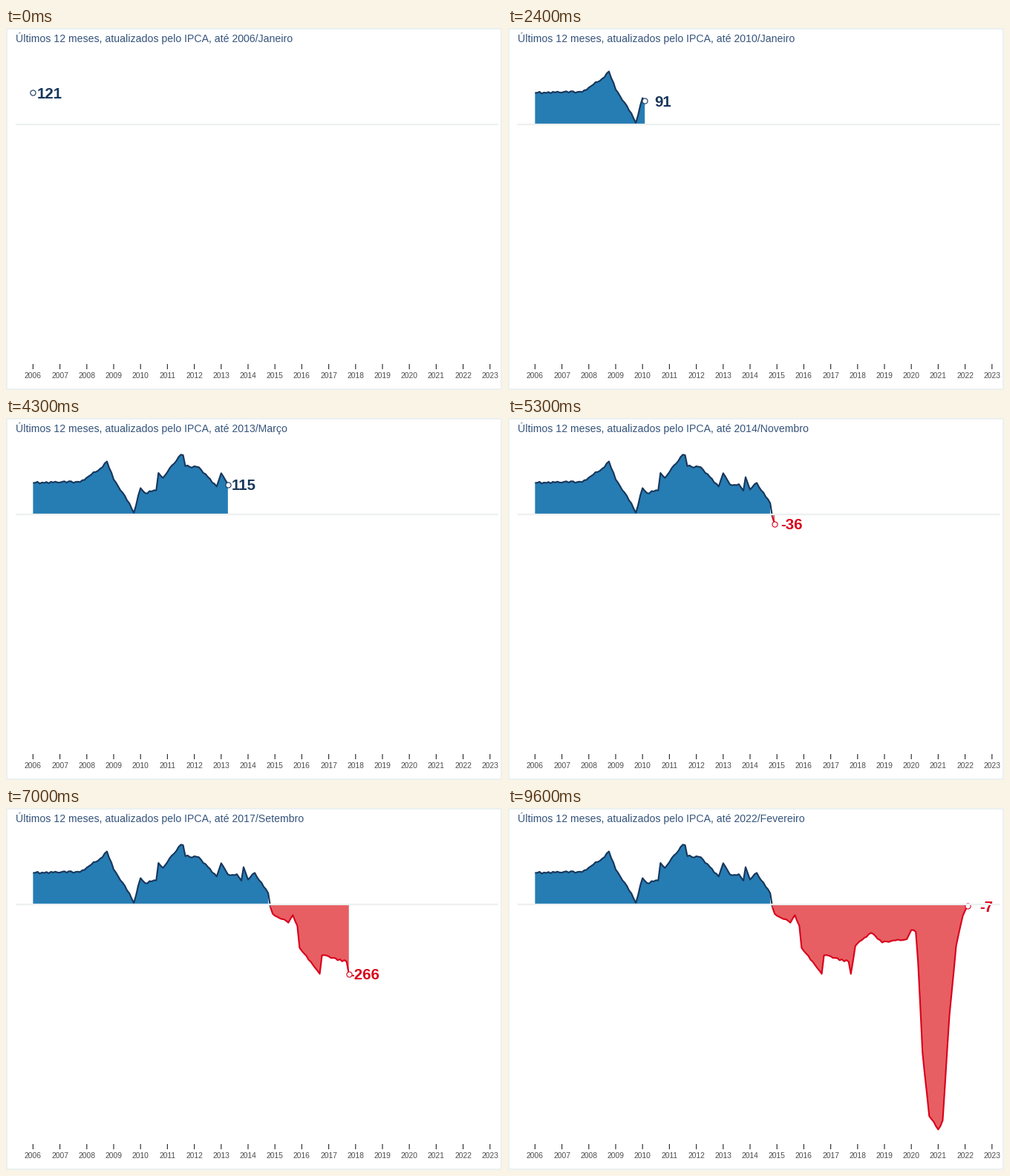
Animation, 668 px wide and 488 px high, one loop 9.7 s. Source, as a matplotlib script:

```python
import numpy as np
import matplotlib.pyplot as plt
from matplotlib.animation import FuncAnimation
from matplotlib.patches import Polygon, Rectangle

W, H, DPI = 668, 488, 100
FRAMES, LAST = 97, 193
ZERO_Y, Y_SCALE = 130, 0.352
X0, MONTH_W = 36.4, 36.2 / 12

NAVY, BLUE = "#17365c", "#267db3"
RED, PINK = "#d9001b", "#e75f63"
PALE = "#ecf0f1"

MONTHS = ("Janeiro Fevereiro Março Abril Maio Junho Julho Agosto "
          "Setembro Outubro Novembro Dezembro").split()

# Turning points (month, value); a small seeded ripple fills the gaps
TURNS = [
    (0, 121), (21, 124), (31, 181), (33, 203), (36, 134), (43, 43), (45, 6),
    (48, 101), (50, 82), (55, 92), (56, 159), (58, 140), (66, 229), (67, 227),
    (68, 185), (74, 181), (82, 107), (84, 158), (87, 115), (91, 116),
    (93, 91), (94, 143), (96, 95), (99, 121), (105, 43), (106, -11),
    (107, -36), (114, -70), (116, -41), (118, -82), (119, -166), (128, -266),
    (129, -195), (140, -219), (141, -266), (143, -159), (150, -109),
    (155, -146), (166, -133), (168, -98), (170, -105), (171, -221),
    (173, -568), (176, -811), (180, -862), (182, -827), (185, -426),
    (188, -159), (191, -43), (193, -7),
]

months = np.arange(LAST + 1)
turn_months, turn_values = np.array(TURNS).T
ripple = np.random.default_rng(4).uniform(-4, 4, LAST + 1)
ripple[turn_months] = 0
values = np.interp(months, turn_months, turn_values) + ripple
split = int(np.argmax(values < 0))
xs = X0 + months * MONTH_W
ys = ZERO_Y - values * Y_SCALE


def px(size):
    """Pixels to points."""
    return size * 72 / DPI


plt.rcParams["font.family"] = "Liberation Sans"
plt.rcParams["path.snap"] = False
fig = plt.figure(figsize=(W / DPI, H / DPI), dpi=DPI, facecolor="white")
ax = fig.add_axes([0, 0, 1, 1])
ax.set_xlim(0, W)
ax.set_ylim(H, 0)
ax.axis("off")


def rule(x, y, color, width, z=1):
    ax.plot(x, y, color=color, lw=px(width), solid_capstyle="butt", zorder=z)


# Static parts: border, zero line, year axis
ax.add_patch(Rectangle((1, 1), W - 2, H - 2, fill=False, ec=PALE, lw=px(2)))
rule([13, 662.5], [ZERO_Y, ZERO_Y], PALE, 2.2, z=9)
for year in range(2006, 2024):
    x = X0 + 12 * (year - 2006) * MONTH_W
    rule([x, x], [453, 460], "#333333", 1.2)
    ax.text(x, 472.5, str(year), size=px(10.3), color="#4d4d4d",
            ha="center", va="baseline")

title = ax.text(13, 19, "", size=px(14.15), color="#35537b", va="baseline")


def make_area(fill, edge, z):
    area = Polygon([(0, 0)], closed=True, fc=fill, ec="none", zorder=z)
    ax.add_patch(area)
    line, = ax.plot([], [], color=edge, lw=px(2.1), zorder=z + 1,
                    solid_joinstyle="round", solid_capstyle="butt")
    return area, line


blue = make_area(BLUE, NAVY, 2)
red = make_area(PINK, RED, 4)
label = ax.text(0, 0, "", size=px(20.4), weight="bold", va="baseline",
                zorder=6)
dot, = ax.plot([], [], "o", ms=px(7.2), mfc="#f6f9fb", mew=px(1.1), zorder=7)


def show(parts, start, fill_end, line_end):
    """Reveal one area from start up to, but not including, the given ends."""
    area, line = parts
    visible = fill_end > start
    area.set_visible(visible)
    line.set_visible(visible)
    if visible:
        x, y = xs[start:fill_end], ys[start:fill_end]
        top = np.column_stack([x, y])
        area.set_xy(np.vstack([(x[0], ZERO_Y), top, (x[-1], ZERO_Y)]))
        line.set_data(xs[start:line_end], ys[start:line_end])


def draw(frame):
    month = frame * LAST // (FRAMES - 1)
    tip = -(-frame * LAST // (FRAMES - 1))
    title.set_text("Últimos 12 meses, atualizados pelo IPCA, até "
                   f"{2006 + month // 12}/{MONTHS[month % 12]}")

    show(blue, 0, min(tip + 1, split), min(tip + 1, split + 1))
    show(red, split, tip + 1, tip + 1)

    value = int(round(values[tip]))
    color = NAVY if value >= 0 else RED
    text_w = 11.34 * len(str(abs(value))) + (6.8 if value < 0 else 0)
    label.set_text(str(value))
    label.set_color(color)
    label.set_position((xs[tip] + 29.8 - 0.73 * text_w, ys[tip] + 7.5))
    dot.set_data([xs[tip]], [ys[tip]])
    dot.set_markeredgecolor(color)
    return title, label, dot, *blue, *red


anim = FuncAnimation(fig, draw, frames=FRAMES, interval=100, repeat=True,
                     repeat_delay=0, blit=False)
plt.show()
```
